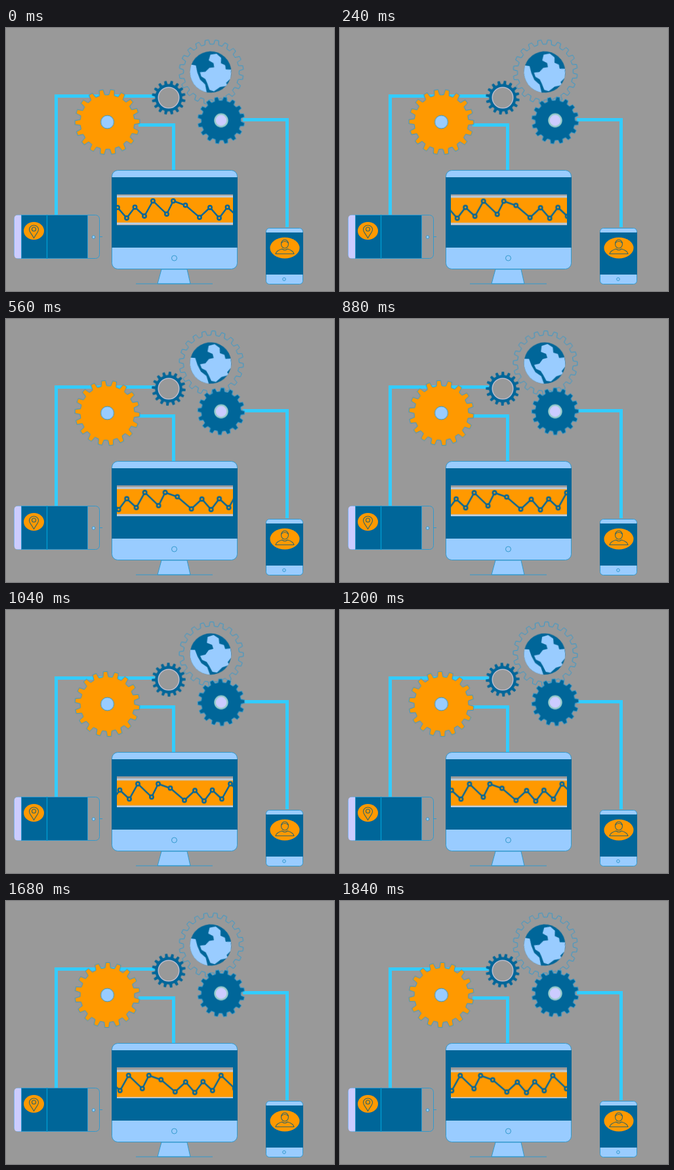
An HTML page for the animation above (1920 ms loop, 500 by 400 pixels).

```html
<!DOCTYPE html>
<html lang="en">
<head>
<meta charset="utf-8">
<title>Connected devices</title>
<style>
  html, body { margin: 0; width: 100%; height: 100%; overflow: hidden; background: #999; }
  svg { display: block; width: 500px; height: 400px; }
  .dark { fill: #069; }
  .light { fill: #9cf; }
  .pale { fill: #ccf; }
  .orange { fill: #f90; }
  .edge { stroke: #39c; stroke-width: 1; }
  .cable { fill: none; stroke: #3cf; stroke-width: 5; }
  .icon { fill: none; stroke: #366; stroke-width: 1.1; }
  .gear { stroke-linejoin: round; }
  .spin { animation: spin 1920ms steps(24) infinite; }
  .rock { transform: rotate(10deg); animation: rock 1920ms steps(12) infinite; }
  #strip { animation: scroll 1920ms steps(24) infinite; }
  #rails { animation: drop 1920ms steps(24) infinite; }
  @keyframes spin { from { transform: rotate(var(--from)); } to { transform: rotate(var(--to)); } }
  @keyframes rock { 50% { transform: rotate(0deg); } }
  @keyframes scroll { to { transform: translate(-42.5px, 2.6px); } }
  @keyframes drop { to { transform: translateY(2.6px); } }
</style>
</head>
<body>
<svg viewBox="0 0 500 400">
  <defs>
    <clipPath id="window"><rect x="169" y="253" width="177" height="47"/></clipPath>
    <clipPath id="disc"><circle r="31.5"/></clipPath>
  </defs>

  <g class="cable">
    <path d="M76.5 284V103.5H227"/>
    <path d="M202 147.5H255.5V216"/>
    <path d="M361 139.5H428.5V303"/>
  </g>

  <!-- gears -->
  <g transform="translate(313 67)">
    <g class="rock">
      <path class="gear edge" data-gear="20 49 42.5" fill="none"/>
    </g>
  </g>
  <g transform="translate(312 67)">
    <g class="rock">
      <circle class="dark" r="31.5"/>
      <g class="light" clip-path="url(#disc)">
        <path d="M-5 -26L4 -29L12 -24L13 -16L20 -14L22 -8L30 -9L32 4L26 12L29 16L18 20L10 28L3 27L-2 18L-6 12L-13 9L-16 3L-8 1L-3 -6L4 -8L2 -14L-6 -17Z"/>
        <path d="M-33 -6L-24 -6L-20 4L-14 14L-5 20L0 33L-18 32L-33 12Z"/>
      </g>
    </g>
  </g>
  <g transform="translate(154.5 143)">
    <path class="gear spin orange edge" data-gear="18 49.5 41.5" style="--from:-11deg;--to:2.7deg"/>
    <circle class="light edge" r="10"/>
  </g>
  <g transform="translate(248 106)">
    <path class="gear spin dark" data-gear="16 25.8 20.8" style="--from:11deg;--to:-11.5deg"/>
    <circle r="15.8" fill="#999" stroke="#bbc" stroke-width="1.5"/>
  </g>
  <g transform="translate(328 140.5)">
    <path class="gear spin dark edge" data-gear="16 35.8 30.5" style="--from:10deg;--to:-12.5deg"/>
    <circle class="pale" r="9.5" stroke="#9cc" stroke-width="2.5"/>
  </g>

  <!-- monitor -->
  <path class="light edge" d="M237 367H276L281 389H231Z"/>
  <path class="edge" d="M198 389H315"/>
  <rect class="light edge" x="161.5" y="216.5" width="191" height="150" rx="9"/>
  <path class="dark" fill-rule="evenodd" d="M161 227H353V334H161ZM169 253V300H346V253Z"/>
  <g clip-path="url(#window)">
    <rect x="169" y="253" width="177" height="47" fill="#999"/>
    <g id="rails">
      <rect x="169" y="254.7" width="177" height="44.3" fill="#bcd"/>
      <rect class="orange" x="169" y="257.8" width="177" height="38"/>
    </g>
    <g id="strip" fill="#f90" stroke="#069" stroke-width="2.4"></g>
  </g>
  <circle class="light edge" cx="256.5" cy="350" r="4"/>

  <!-- tablet -->
  <rect class="edge" x="12.5" y="284.5" width="130" height="66" rx="6" fill="none"/>
  <path class="pale" d="M24 284.5H18Q12.5 284.5 12.5 290V345Q12.5 350.5 18 350.5H24Z"/>
  <rect class="dark edge" x="23.5" y="284.5" width="101" height="66"/>
  <path d="M62.5 284V351" stroke="#09c" stroke-width="1.5"/>
  <circle class="light edge" cx="133.5" cy="318" r="2.2"/>
  <path class="edge" d="M143 317.5H147"/>
  <ellipse class="orange" cx="42.5" cy="308.5" rx="15.5" ry="13.5"/>
  <g class="icon">
    <path d="M42.5 319.5C39 313 35.5 310 35.5 306.5A7 6.5 0 0 1 49.5 306.5C49.5 310 46 313 42.5 319.5Z"/>
    <circle cx="42.5" cy="306" r="3"/>
  </g>

  <!-- phone -->
  <rect class="light edge" x="396.5" y="304.5" width="56" height="85" rx="5"/>
  <rect class="dark" x="396" y="311" width="57" height="64"/>
  <circle class="light edge" cx="424" cy="382" r="2.3"/>
  <ellipse class="orange" cx="425" cy="334.5" rx="22.5" ry="16"/>
  <g class="icon">
    <ellipse cx="425" cy="328.5" rx="5.5" ry="6.5"/>
    <path d="M419.5 327Q425 322 430.5 327"/>
    <path d="M411 343.5Q412 338.5 421 336Q425 339.5 429 336Q438 338.5 439 343.5Z"/>
  </g>
</svg>
<script>
  // Trapezoid teeth, the first one centred at the top.
  function gearPath(teeth, outer, root) {
    const pitch = 2 * Math.PI / teeth;
    const corners = [[-0.29, root], [-0.18, outer], [0.18, outer], [0.29, root]];
    const points = [];
    for (let i = 0; i < teeth; i++) {
      for (const [offset, r] of corners) {
        const a = (i + offset) * pitch;
        points.push((r * Math.sin(a)).toFixed(2) + " " + (-r * Math.cos(a)).toFixed(2));
      }
    }
    return "M" + points.join("L") + "Z";
  }

  for (const gear of document.querySelectorAll(".gear")) {
    gear.setAttribute("d", gearPath(...gear.dataset.gear.split(" ").map(Number)));
  }

  // One period of the chart, repeated on both sides.
  const wave = [[184, 289], [196.5, 272.5], [211, 286], [224, 263], [245, 283],
                [255, 263], [273.5, 269.5], [295, 288], [311, 273]];
  const period = 141;
  const points = [-1, 0, 1].flatMap(n => wave.map(([x, y]) => [x + n * period, y]));
  const line = `<polyline fill="none" points="${points.join(" ")}"/>`;
  const dots = points.map(([x, y]) => `<circle cx="${x}" cy="${y}" r="2.7"/>`);
  document.getElementById("strip").innerHTML = line + dots.join("");
</script>
</body>
</html>
```
